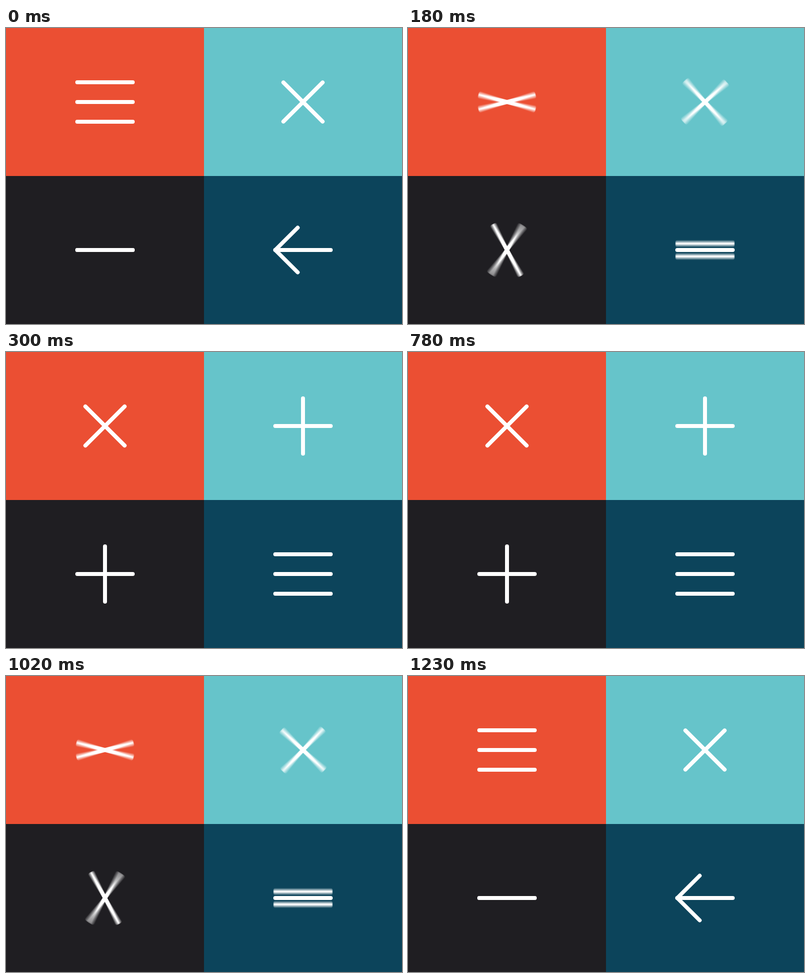
Write an HTML page with a canvas that moves like this. It is 800 by 600 pixels and loops after 1.8 s.

```html
<!DOCTYPE html>
<html lang="en">
<head>
<meta charset="utf-8">
<title>Icon transitions</title>
<style>
  html, body { margin: 0; width: 100%; height: 100%; overflow: hidden; }
  canvas { display: block; }
</style>
</head>
<body>
<canvas id="stage" width="800" height="600"></canvas>
<script>
const LOOP = 1800, STEP = 30;
const SHUTTER = 0.5, SAMPLES = 16;
const HALF = 56, ARM = 64, GAP = 40;

const stage = document.getElementById('stage').getContext('2d');
const layerCanvas = document.createElement('canvas');
layerCanvas.width = 400;
layerCanvas.height = 300;
const layer = layerCanvas.getContext('2d');
layer.lineWidth = 8;
layer.lineCap = 'round';
layer.strokeStyle = '#fff';

const clamp = v => Math.min(1, Math.max(0, v));

// Cubic bezier easing, solved by bisection.
function bezier(x1, y1, x2, y2) {
  const at = (s, a, b) => 3 * (1 - s) * (1 - s) * s * a + 3 * (1 - s) * s * s * b + s * s * s;
  return u => {
    if (u <= 0) return 0;
    if (u >= 1) return 1;
    let lo = 0, hi = 1;
    for (let i = 0; i < 30; i++) {
      const mid = (lo + hi) / 2;
      if (at(mid, x1, x2) < u) lo = mid; else hi = mid;
    }
    return at(lo, y1, y2);
  };
}
const swing = bezier(0.48, 0, 0.52, 1);
const settle = bezier(0.167, 0.167, 0.42, 1);
const firstHalf = p => settle(1 - 2 * p);
const secondHalf = p => settle(2 * p - 1);

// A stroke relative to the centre of its tile; angles in degrees, clockwise.
const bar = (angle, y = 0) => ({ x: 0, y, angle, from: -HALF, to: HALF });
const arm = angle => ({ x: -HALF, y: 0, angle, from: 0, to: ARM });

const menuSide = side => p => p < 0.5
  ? bar(0, side * GAP * firstHalf(p))
  : bar(side * 45 * secondHalf(p));
const arrowSide = side => p => p < 0.5
  ? arm(side * 45 * firstHalf(p))
  : bar(0, side * GAP * secondHalf(p));
const spin = (start, turn) => p => bar(start + turn * swing(p));

// "extra" lengthens the return at both ends, in steps.
const tiles = [
  { x: 0, y: 0, color: '#eb4f33', extra: 0,
    lines: [menuSide(-1), menuSide(1), p => p < 0.5 ? bar(0) : null] },
  { x: 400, y: 0, color: '#66c4ca', extra: 1,
    lines: [spin(45, 135), spin(-45, 135)] },
  { x: 0, y: 300, color: '#1f1e22', extra: 0,
    lines: [spin(0, 180), spin(0, 90)] },
  { x: 400, y: 300, color: '#0c445b', extra: 0,
    lines: [arrowSide(-1), arrowSide(1), () => bar(0)] }
];

function progress(step, extra) {
  return step < 20
    ? clamp(step / 10)
    : 1 - clamp((step - 30 + extra) / (10 + 2 * extra));
}

function strokeLine({ x, y, angle, from, to }) {
  const a = angle * Math.PI / 180, c = Math.cos(a), s = Math.sin(a);
  const cx = 200 + x, cy = 150 + y;
  layer.beginPath();
  layer.moveTo(cx + from * c, cy + from * s);
  layer.lineTo(cx + to * c, cy + to * s);
  layer.stroke();
}

// Averages each line over the open shutter to give motion blur.
function drawTile(tile, step) {
  stage.fillStyle = tile.color;
  stage.fillRect(tile.x, tile.y, 400, 300);
  const at = offset => progress(step + offset * SHUTTER, tile.extra);
  const count = at(-0.5) === at(0.5) ? 1 : SAMPLES;
  for (const line of tile.lines) {
    layer.clearRect(0, 0, 400, 300);
    layer.globalCompositeOperation = 'lighter';
    layer.globalAlpha = 1 / count;
    for (let i = 0; i < count; i++) {
      const shape = line(at((i + 0.5) / count - 0.5));
      if (shape) strokeLine(shape);
    }
    stage.drawImage(layerCanvas, tile.x, tile.y);
  }
}

function render(time) {
  const step = Math.floor((time % LOOP) / STEP + 0.01);
  for (const tile of tiles) drawTile(tile, step);
}

const start = performance.now();
function tick() {
  render(performance.now() - start);
  requestAnimationFrame(tick);
}
tick();
</script>
</body>
</html>
```
